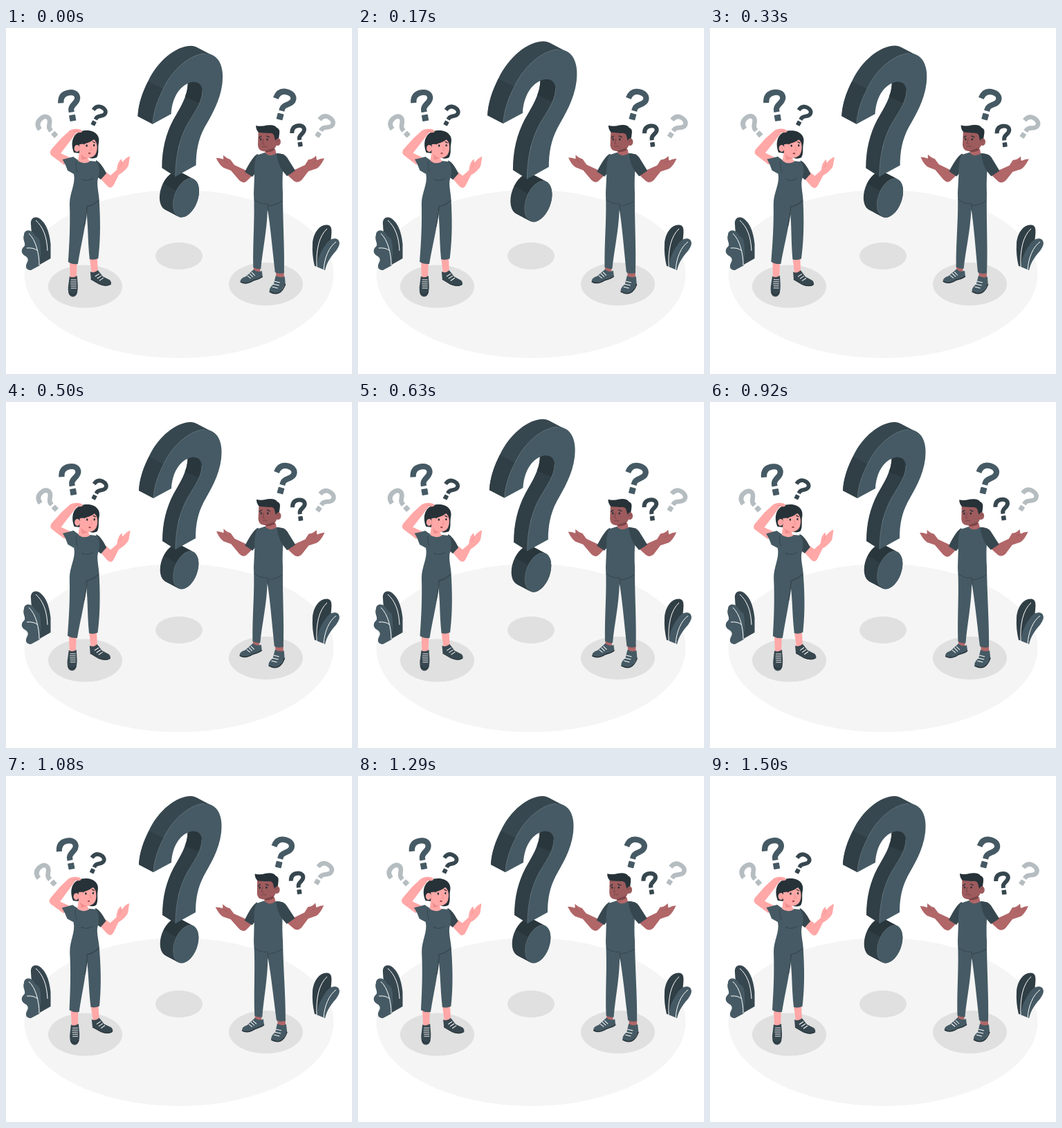
Write an HTML page with a canvas that moves like this. It is 500x500 px and loops after 1.54 s.

```html
<!DOCTYPE html>
<html lang="en">
<head>
<meta charset="utf-8">
<title>Questions</title>
<style>
html, body { margin: 0; width: 100%; height: 100%; overflow: hidden; background: #fff; }
canvas { display: block; width: 500px; height: 500px; }
</style>
</head>
<body>
<canvas id="stage" width="500" height="500"></canvas>
<script>
const ctx = document.getElementById('stage').getContext('2d');
const LOOP = 1540, LEAD = 40;
const SLATE = '#455a64', DEEP = '#37474f', SHADE = '#303e45', INK = '#263238', PALE = '#b5bdc1';
const PINK = '#ffa8a7', ROSE = '#f28f8f', BROWN = '#b16668', FACE = '#9e5b5d', UMBER = '#7a4547';

function fill(d, color) {
  ctx.fillStyle = color;
  ctx.fill(new Path2D(d));
}

function line(d, color, width = 1) {
  ctx.strokeStyle = color;
  ctx.lineWidth = width;
  ctx.stroke(new Path2D(d));
}

function oval(x, y, rx, ry, color, tilt = 0) {
  ctx.fillStyle = color;
  ctx.beginPath();
  ctx.ellipse(x, y, rx, ry, tilt, 0, Math.PI * 2);
  ctx.fill();
}

// Runs draw() rotated (degrees) and scaled about a point.
function around(x, y, degrees, scale, draw) {
  ctx.save();
  ctx.translate(x, y);
  ctx.rotate(degrees * Math.PI / 180);
  ctx.scale(scale, scale);
  ctx.translate(-x, -y);
  draw();
  ctx.restore();
}

// Small question mark; (x, y) is the centre of its dot.
function mark(x, y, degrees, scale, color) {
  ctx.save();
  ctx.translate(x, y);
  ctx.rotate(degrees * Math.PI / 180);
  ctx.scale(scale, scale);
  fill('M-4.5 -3.6Q-4.5 -4.5 -3.6 -4.5H3.6Q4.5 -4.5 4.5 -3.6V3.6Q4.5 4.5 3.6 4.5H-3.6Q-4.5 4.5 -4.5 3.6Z', color);
  line('M0 -8.5V-11.500C0 -19.500 12 -20 12 -28.500C12 -34 7 -37 .5 -37C-7 -37 -12 -33 -13 -24', color, 8.2);
  ctx.restore();
}

// Piecewise linear value through [time, value] pairs.
function keyed(keys, t) {
  const i = keys.findIndex(k => k[0] >= t);
  if (i < 1) return keys[0][1];
  const [t0, v0] = keys[i - 1], [t1, v1] = keys[i];
  return v0 + (v1 - v0) * (t - t0) / (t1 - t0);
}

const BEAT = [[0, 1], [.1, 1.1], [.3, 1], [.4, 1], [.5, 1.1], [.6, 1], [1, 1]];
const SWAY = [[0, 0], [.25, 1], [.75, -1], [1, 0]];

function ground() {
  oval(250, 355.5, 223.5, 121.5, '#f5f5f5');
  oval(250, 329.5, 34, 19.5, '#e0e0e0');
  oval(114.5, 373.5, 53.5, 31, '#e0e0e0');
  oval(375.5, 370, 53.5, 31, '#e0e0e0');
}

function plants() {
  fill('M36 284C35 276 40 272 46 274C57 279 63 295 64.500 312V333L47 343C45 322 36 302 36 284Z', DEEP);
  fill('M26 299C26 291 36 290 41 298C44 303 47 302 49 308C51 320 50 332 49 343L36 350C29 350 27 345 31 338C33 334 31 331 27 329C21 325 22 319 26 316C30 312 23 306 26 299Z', SLATE);
  line('M43 278C53 287 59 300 60 322M33 297C43 306 48 326 48 343M30 318Q40 317 46 322', '#fff');

  fill('M443 312C444 296 453 284 464 284.500C471 285 471 292 470 301C469 315 464 330 459 347L446 344Q442 328 443 312Z', SHADE);
  fill('M462 313C467 305 475 302 480 306C484 311 481 316 477 322C469 331 464 338 461 350L449 345C451 331 455 322 462 313Z', SLATE);
  line('M464 290C452 301 448 321 449 345M477 309C467 316 460 332 459 350', '#fff');
}

function bigMark() {
  const tilt = Math.PI / 9;
  const side = ctx.createLinearGradient(226, 238, 240, 213);
  side.addColorStop(.5, SHADE);
  side.addColorStop(.51, '#29363c');
  for (let k = 0; k <= 20; k++) oval(241 + .95 * k, 233 + .5 * k, 16.5, 28.5, side, tilt);
  oval(260, 243, 16.5, 28.5, SLATE, tilt);
  ctx.strokeStyle = '#829097';
  ctx.lineWidth = .4;
  ctx.beginPath();
  ctx.ellipse(260, 243, 16.5, 28.5, tilt, 2, 4.9);
  ctx.stroke();

  // Outer thickness, then the inside of the hook and stem
  const back = 'M213 139L192 128C193 110 199 94 206.500 79';
  fill(back + 'C220 50 246 29 267 29Q271 29 275 31L296 42L270 60L225 110Z', DEEP);
  fill(back + 'L231 91.500L225 125Z', SHADE);
  fill('M245 213L226 201C226 175 231.500 153 242 133C251 117 262.500 100 262.500 81L284 86V110L250 170Z', SHADE);
  fill('M262.500 84V78L276 72L290 88L282 111L258.500 101Q262 93 262.500 84Z', '#29363c');

  const outer = 'M213 139C214 121 220 105 227.500 90.500C241 61 267 40.500 287 40';
  fill(outer + 'C306 40 314 58 311 82C308 107 295 128 286 144C277 161 274 178 274 197L245 213C245 186 250 163 260 143C269 126 283 110 283 92C282 82 276 79 268 80C250 84 240 104 239 125Z', SLATE);
  line(outer + 'M245 213C245 186 250 163 260 143C269 126 283 110 283 92', '#829097', .5);
}

function woman() {
  mark(96, 130, -10, 1, SLATE);
  mark(126.5, 137.5, 27, .7, DEEP);
  mark(70, 154, -43, .82, PALE);

  // Ankles and shoes
  fill('M92 337H103L102 361H93Z', PINK);
  fill('M121 332H132L133 352L124 355Z', PINK);
  fill('M92 359Q97 362 103 358L104 372C104 382 103 388 97 388.500C91 388 90 383 90 375Z', DEEP);
  line('M94 364H102M93.500 367H102M93.500 370H102M94 373H102M94 376H102', '#fff', .9);
  line('M91 382Q97 389 103 382', INK);
  fill('M122 352Q127 355 133 350L140 359L150 364Q153 367 152 370C148 374 140 373 135 370L123 363Z', DEEP);
  line('M129 359L135 355M132 362L138 358M135 365L141 361', '#fff');
  line('M123 363L135 370Q145 374 152 370', INK);

  // Lowered arm
  fill('M137 218L146 228Q152 234 156 226L163 212C169 209 176 202 177 198L179 185Q173 187 168 194L167 189Q161 193 160 205L151 213L143 207Z', PINK);
  line('M167 194Q167 199 164 201', ROSE, .8);
  fill('M130 191Q137 194 145 210L137 219L128 212Z', DEEP);

  // Clothes
  fill('M96 187L104 191Q112 196 121 192L131 193C135 199 136 208 133 217C130 226 135 240 135 254C137 288 136 312 133.500 333Q127 336 121 334C118 305 119 285 116 264C116 285 109 310 104 341Q96 342 90 338C92 307 93 285 92 254C92 238 101 225 98 211Z', SLATE);
  line('M134 249Q125 257 117 258Q116 275 113 287', DEEP, 1.5);
  line('M109 218Q117 223 126 217', DEEP);

  // Head
  fill('M98 180C92 165 97 151 111 148.500C126 146 136 154 134 165C132 174 135 180 131 187Q125 190 119 187L106 181Z', INK);
  fill('M106 178L117 186L121 193Q112 198 104 192Z', PINK);
  fill('M108 182L119 187Q114 191 109 190Z', ROSE);
  fill('M106 168Q118 168 127 161Q132 165 131.500 174Q131 181 128 184Q122 189 116 187.500Q109 185 106 179Z', PINK);
  oval(102.5, 174, 4, 5, PINK);
  line('M101 172Q104 172 104 176', ROSE, .8);
  oval(116.5, 170, 1.3, 1.7, INK);
  oval(127, 169.5, 1.2, 1.7, INK);
  line('M112 168L116 165M125 164L129 166', INK, 1.3);
  line('M122 171L124 176L121 177', ROSE);
  oval(120.5, 181, 1.8, 1.2, '#a64d50');

  // Raised arm
  fill('M108 147Q100 144 92 148L79 160L65 176Q61 182 68 186L84 198L94 188L79 181L92 164Q97 157 102 151Q110 152 110 149Z', PINK);
  line('M98 150Q102 148 106 150', ROSE, .8);
  fill('M81.500 190Q90 188 97 186L104 191L98 211L89 206Q86 197 81.500 190Z', SLATE);
  line('M101 193Q100 200 103 208', DEEP);
}

function man() {
  mark(395.9, 128, 15, 1, SLATE);
  mark(425, 168, -8, .73, DEEP);
  mark(451, 154, 33, .8, PALE);

  // Ankles and shoes
  fill('M358 344H368L367 355H358Z', BROWN);
  fill('M390 350H402V363H391Z', BROWN);
  fill('M358 349Q363 354 370 351L371 359C367 364 359 363 354 367Q346 371 339 367Q338 362 347 359Z', SLATE);
  line('M349 358L354 362M352 355L357 360M355 353L360 358', '#fff');
  line('M339 367Q346 371 354 367C359 363 366 364 371 359', INK, 1.5);
  fill('M390 358Q397 362 403 359L404 370C400 375 399 381 394 383Q386 385 381 381Q380 376 387 370Z', SLATE);
  line('M388 366L396 368M386 370L395 372M385 374L393 376', '#fff');
  line('M381 381Q388 385 394 383Q400 381 404 370', INK, 1.5);

  // Arms
  fill('M345 205L330 198L324 190Q319 189 314 184L314 190Q309 188 303.500 188Q308 198 314 202L325 206L337 220Q343 226 348 221L357 212Z', BROWN);
  fill('M417 205L432 198L437 190Q443 190 448 184.500L449 191Q455 188 460 188Q455 199 449 203L437 207L427 220Q421 225 416 221L405 211Z', BROWN);
  line('M314 190L320 195M449 191L443 195', FACE, .8);
  fill('M364 182Q357 184 345 208L356 215L366 203Z', DEEP);
  fill('M375 175H389L391 184Q382 189 374 183Z', BROWN);

  // Clothes
  fill('M362 184L374 180Q381 188 391 181L402 183C400 202 399 218 400 238C400 280 403 320 402 354Q394 356 389 353C385 318 382 285 378 262C377 295 371 320 368.500 348Q363 349 357.500 346C356.500 310 360 274 358 239L359 212Q358 196 362 184Z', SLATE);
  fill('M391 181Q402 181 406 187L418 206L406 214L400 207Q393 198 391 181Z', DEEP);
  line('M359 248Q367 255 378 254L379 265M399 250Q390 256 379 257', DEEP);

  // Head
  fill('M364.500 149H389L391 169Q388 176 384 177Q377 180 368 177Q363 174 364 165Z', FACE);
  fill('M374 178L388 173L387 177Q380 180 376 179.500Z', UMBER);
  oval(392.5, 164.5, 4.3, 5.5, FACE);
  line('M391 165Q392 161 395 163', UMBER, .8);
  fill('M361 141Q368 143 377 140.500Q388 139 391 144Q396 146 395 152L394 159.500Q391 159 389 163L387 155Q385 151 379 152L365 151Q361 147 361 141Z', INK);
  oval(368, 161, 1.2, 1.6, INK);
  oval(377.5, 161, 1.3, 1.6, INK);
  line('M365 159L369 156M376 156L381 158', INK, 1.3);
  line('M372 160L370.500 167L373 168', UMBER);
  line('M370 172Q373 170 377 172', UMBER);
}

function draw(now) {
  const phase = ((now + LEAD) % LOOP) / LOOP;
  const angle = keyed(SWAY, phase);
  ctx.fillStyle = '#fff';
  ctx.fillRect(0, 0, 500, 500);
  ground();
  plants();
  around(252, 150, 0, keyed(BEAT, phase), bigMark);
  around(110, 239, angle, 1, woman);
  around(390, 236, angle, 1, man);
}

const start = performance.now();
function tick() {
  draw(performance.now() - start);
  requestAnimationFrame(tick);
}
tick();
</script>
</body>
</html>
```
